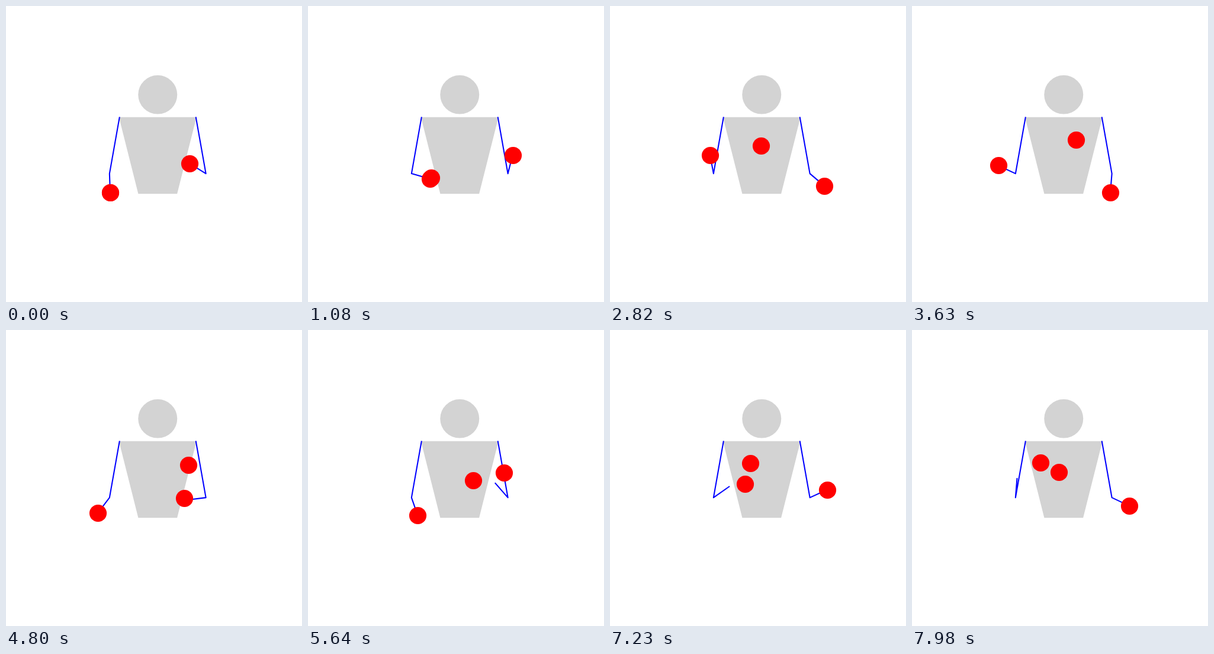
Write an HTML page with a canvas that moves like this. It is 500 px wide and 500 px high and loops after 8000 ms.

```html
<!DOCTYPE html>
<html>
<head>
<meta charset="utf-8">
<title>Juggler</title>
<style>
  html, body { margin: 0; width: 100%; height: 100%; overflow: hidden; background: #fff; }
  canvas { display: block; }
</style>
</head>
<body>
<canvas id="stage" width="500" height="500"></canvas>
<script>
const ctx = document.getElementById("stage").getContext("2d");
const LOOP = 8000, STEP = 30;
const RAD = Math.PI / 180;
const TURN = 0.035, SPEED = 0.05, GRAVITY = 0.0004; // radians and units per step
const LEFT = -1, RIGHT = 1;

// Units have their origin at the body's centre, y pointing up.
const px = x => 256.25 + x * 387.5 / 12;
const py = y => 252.5 - y * 385 / 12;

const shoulder = side => [2 * side, 2];
const elbow = side => [side * (2 + 3 * Math.sin(10 * RAD)), 2 - 3 * Math.cos(10 * RAD)];

// Forearm angle below the inward horizontal.
const forearm = (side, n) => (side === LEFT ? 88 : -32) * RAD - TURN * n;

function hand(side, n) {
  const [x, y] = elbow(side), a = forearm(side, n);
  return [x - side * Math.cos(a), y - Math.sin(a)];
}

// Each ball leaves its hand along the tangent and is caught by the other hand.
const balls = [
  { side: LEFT, thrown: 29, caught: 212 },
  { side: RIGHT, thrown: 149, caught: Infinity },
  { side: LEFT, thrown: 209, caught: Infinity }
];

function ballAt({ side, thrown, caught }, n) {
  if (n <= thrown) return hand(side, n);
  if (n >= caught) return hand(-side, n);
  const [x, y] = hand(side, thrown), a = forearm(side, thrown), m = n - thrown;
  return [
    x - side * SPEED * Math.sin(a) * m,
    y + SPEED * Math.cos(a) * m - GRAVITY * m * (m + 1) / 2
  ];
}

function trace(points) {
  ctx.beginPath();
  points.forEach(([x, y]) => ctx.lineTo(px(x), py(y)));
}

function drawBody() {
  ctx.fillStyle = ctx.strokeStyle = "#d3d3d3";
  ctx.lineWidth = 1.39;
  ctx.lineJoin = "miter";
  trace([[-2, 2], [2, 2], [1, -2], [-1, -2]]);
  ctx.closePath();
  ctx.fill();
  ctx.stroke();
  ctx.beginPath();
  ctx.ellipse(px(0), py(3.2), 387.5 / 12, 385 / 12, 0, 0, 2 * Math.PI);
  ctx.fill();
  ctx.stroke();
}

function drawArm(side, n) {
  ctx.strokeStyle = "#00f";
  ctx.lineWidth = 2.08;
  ctx.lineJoin = "round";
  ctx.lineCap = "square";
  trace([shoulder(side), elbow(side), hand(side, n)]);
  ctx.stroke();
}

function drawBall([x, y]) {
  ctx.fillStyle = "#f00";
  ctx.beginPath();
  ctx.arc(Math.round(px(x)) + 0.5, Math.round(py(y)) + 0.5, 14.6, 0, 2 * Math.PI);
  ctx.fill();
}

function draw(time) {
  const n = Math.floor((time % LOOP) / STEP);
  ctx.fillStyle = "#fff";
  ctx.fillRect(0, 0, 500, 500);
  drawBody();
  drawArm(LEFT, n);
  drawArm(RIGHT, n);
  balls.forEach(ball => drawBall(ballAt(ball, n)));
}

const start = performance.now();
function tick() {
  draw(performance.now() - start);
  requestAnimationFrame(tick);
}
tick();
</script>
</body>
</html>
```
